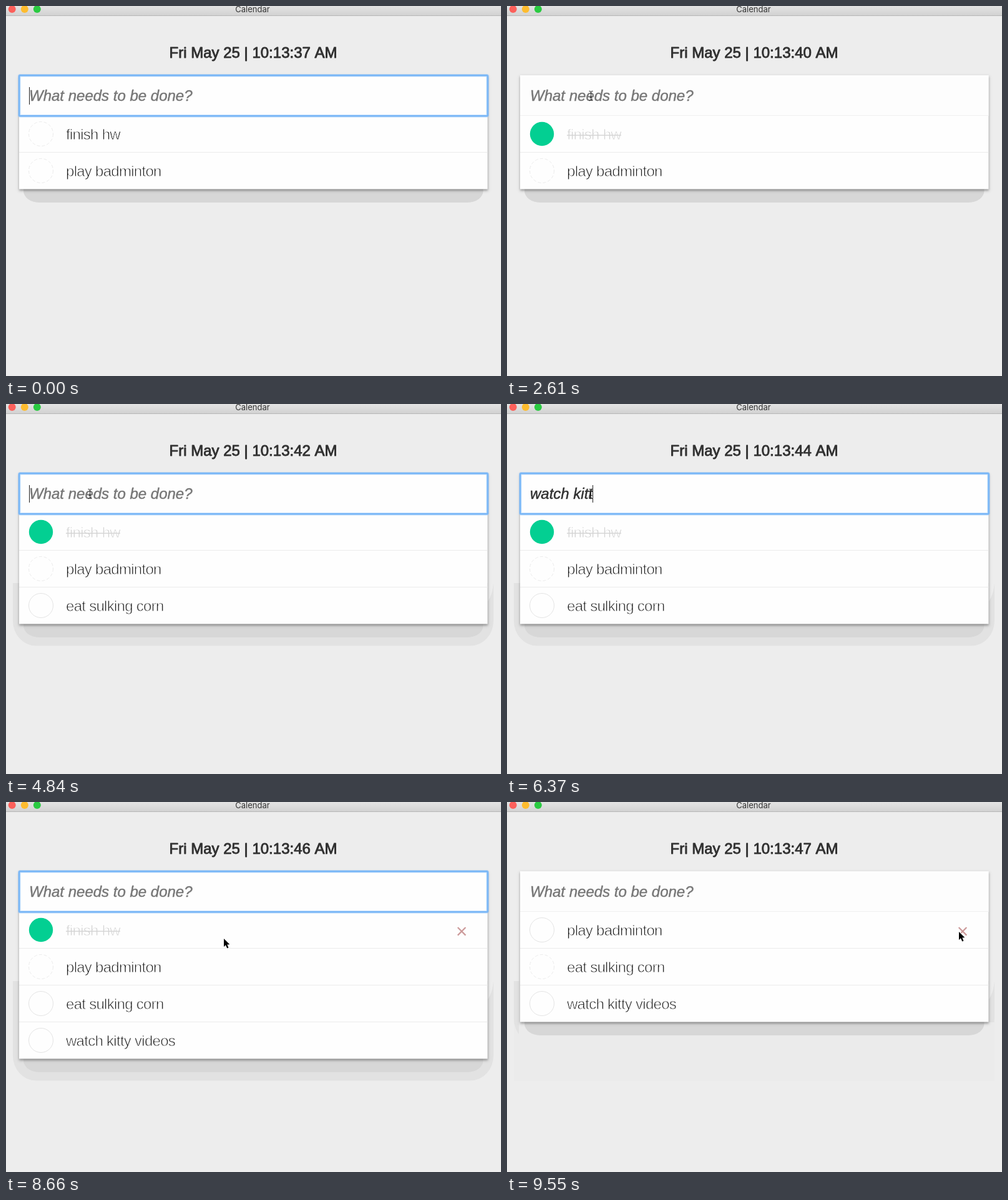
An HTML page with a canvas for the animation above (9.79 s loop, 793 px wide and 593 px high).

```html
<!DOCTYPE html>
<html lang="en">
<head>
<meta charset="utf-8">
<title>Calendar</title>
<style>
  html, body { margin: 0; width: 100%; height: 100%; overflow: hidden; background: #ededed; }
  canvas { display: block; }
</style>
</head>
<body>
<canvas id="stage" width="793" height="593"></canvas>
<script>
const ctx = document.getElementById('stage').getContext('2d');
const W = 793, H = 593, LOOP = 9790;
const SANS = '"Liberation Sans", Arial, sans-serif';
const LEFT = 21, RIGHT = 771.5, TOP = 111, LIST = 176, ROW = 59;

const CHECK = 2050, ADD1 = 4840, ADD2 = 7160, REMOVE = 9500;
const TICKS = [420, 1420, 2420, 3420, 4420, 5250, 6280, 7240, 8350, 9400];
const BLURRED = [[2000, 2700], [9400, LOOP]];
const CARET_OFF = [[420, 920], [1420, 1920], [3200, 3230], [5310, 5540], [7660, 8160], [8660, 9160]];

// each part: text, time of first letter, time per letter
const TYPING = [
  { end: ADD1, parts: [['eat sulking', 3230, 96], [' corn', 4310, 95]] },
  { end: ADD2, parts: [['w', 5540, 0], ['at', 5660, 0], ['ch kitty vide', 5900, 78], ['os', 6920, 90]] }
];

// time, x, y
const POINTER = [
  [570, 788, 100], [920, 520, 132], [1280, 520, 132], [1530, 230, 196],
  [1780, 64, 200], [2230, 64, 200], [2500, 134, 144], [8040, 134, 144],
  [8420, 348, 218], [8660, 348, 218], [9250, 723, 207], [LOOP, 723, 207]
];

const within = (t, spans) => spans.some(([a, b]) => t >= a && t < b);

function typedText(t) {
  const job = TYPING.find(j => t >= j.parts[0][1] && t < j.end);
  if (!job) return '';
  return job.parts.map(([text, start, step]) => {
    if (t < start) return '';
    return step ? text.slice(0, 1 + Math.floor((t - start) / step)) : text;
  }).join('');
}

function pointerAt(t) {
  const i = POINTER.findIndex(p => t < p[0]);
  if (i < 1) return null;
  const [t0, x0, y0] = POINTER[i - 1], [t1, x1, y1] = POINTER[i];
  const k = (t - t0) / (t1 - t0), e = k * k * (3 - 2 * k);
  return { x: x0 + (x1 - x0) * e, y: y0 + (y1 - y0) * e };
}

function itemsAt(t) {
  const list = [
    { text: 'finish hw', done: t >= CHECK, dashed: true },
    { text: 'play badminton', dashed: true }
  ];
  if (t >= ADD1) list.push({ text: 'eat sulking corn' });
  if (t >= ADD2) list.push({ text: 'watch kitty videos' });
  if (t >= REMOVE) {
    list.shift();
    list[0].dashed = false;
    list[1].dashed = true;
  }
  return list;
}

function rect(x, y, w, h, color) {
  ctx.fillStyle = color;
  ctx.fillRect(x, y, w, h);
}

function disc(x, y, r, color) {
  ctx.fillStyle = color;
  ctx.beginPath();
  ctx.arc(x, y, r, 0, 7);
  ctx.fill();
}

function line(points, color, width) {
  ctx.strokeStyle = color;
  ctx.lineWidth = width;
  ctx.beginPath();
  points.forEach(([x, y]) => ctx.lineTo(x, y));
  ctx.stroke();
}

// An extra outline in the text colour thickens it, one in the paper colour thins it.
function write(text, x, y, font, color, edge, edgeColor = color) {
  ctx.font = font;
  ctx.fillStyle = color;
  ctx.fillText(text, x, y);
  if (!edge) return;
  ctx.lineJoin = 'round';
  ctx.lineWidth = edge;
  ctx.strokeStyle = edgeColor;
  ctx.strokeText(text, x, y);
}

function titleBar() {
  const g = ctx.createLinearGradient(0, 0, 0, 15);
  g.addColorStop(0, '#e3e3e3');
  g.addColorStop(1, '#d2d2d2');
  rect(0, 0, W, 15, g);
  rect(0, 15, W, 1, '#b7b7b7');
  disc(9.7, 5, 6, '#fc605b');
  disc(29.8, 5, 6, '#fdbc2f');
  disc(49.8, 5, 6, '#2aca41');
  ctx.textAlign = 'center';
  write('Calendar', 395, 10, '13px Inter, Roboto, sans-serif', '#333');
}

function clock(t) {
  const sec = 37 + TICKS.filter(k => t >= k).length;
  write('Fri May 25 | 10:13:' + sec + ' AM', 396, 83, '24px ' + SANS, '#303030', 0.9);
  ctx.textAlign = 'left';
}

function bowl(x0, x1, y0, y1, rx, ry, color) {
  ctx.fillStyle = color;
  ctx.beginPath();
  ctx.moveTo(x0, y0);
  ctx.lineTo(x0, y1 - ry);
  ctx.ellipse(x0 + rx, y1 - ry, rx, ry, 0, Math.PI, Math.PI / 2, true);
  ctx.lineTo(x1 - rx, y1);
  ctx.ellipse(x1 - rx, y1 - ry, rx, ry, 0, Math.PI / 2, 0, true);
  ctx.lineTo(x1, y0);
  ctx.fill();
}

function outerShade(t, bottom) {
  if (t < ADD1) return;
  ctx.save();
  ctx.beginPath();
  if (t >= REMOVE) {
    rect(11, 287, 770, 160, '#ebebeb');
    ctx.rect(11, 287, 8, 101);
    ctx.rect(771, 287, 10, 66);
  } else {
    ctx.rect(0, 287, W, 200);
  }
  ctx.clip();
  bowl(11, 781, 287, bottom + 35, 37, 40, '#e2e2e2');
  ctx.fillStyle = '#ededed';
  ctx.beginPath();
  ctx.moveTo(772, 287);
  ctx.lineTo(781, 287);
  ctx.quadraticCurveTo(779, 307, 772, 316);
  ctx.fill();
  ctx.restore();
}

function card(t, bottom) {
  outerShade(t, bottom);
  bowl(28, 764.5, bottom - 5, bottom + 21.5, 25, 19, '#d7d7d7');
  ctx.save();
  ctx.shadowColor = 'rgba(0,0,0,.36)';
  ctx.shadowBlur = 4;
  ctx.shadowOffsetY = 2;
  rect(LEFT, TOP, RIGHT - LEFT, bottom - TOP, '#fefefe');
  ctx.restore();
}

function inputBox(t, text, focused) {
  rect(LEFT, TOP, RIGHT - LEFT, LIST - TOP, focused ? '#fefefe' : '#fdfdfd');
  rect(LEFT, LIST - 1, RIGHT - LEFT, 1, '#f0f0f0');
  if (focused) {
    [[4.4, 'rgba(120,184,250,.45)'], [2.4, '#78b6f6']].forEach(([w, color]) => {
      ctx.strokeStyle = color;
      ctx.lineWidth = w;
      ctx.beginPath();
      ctx.roundRect(21.2, 111.2, 750.4, 65, 1.5);
      ctx.stroke();
    });
  }
  const font = 'italic 24px ' + SANS;
  if (text) write(text, 37, 152, font, '#303030', 0.45);
  else write('What needs to be done?', 37, 152, font, '#777', 0.45);
  if (focused && !within(t, CARET_OFF)) {
    const x = text ? Math.round(37 + ctx.measureText(text).width) : 37;
    rect(x, 130, 1, 28, '#222');
  }
}

function checkbox(item, y) {
  if (item.done) {
    disc(56, y, 19.2, '#03cf92');
    return;
  }
  ctx.strokeStyle = item.dashed ? '#ececec' : '#e4e4e4';
  ctx.lineWidth = 1;
  ctx.setLineDash(item.dashed ? [5, 3] : []);
  ctx.beginPath();
  ctx.arc(56, y, 19.5, 0, Math.PI * 2);
  ctx.stroke();
  ctx.setLineDash([]);
}

function row(item, i, hovered) {
  const y = LIST + ROW * i;
  if (i) rect(LEFT, y - 1, RIGHT - LEFT, 1, '#ebebeb');
  checkbox(item, y + 29);
  const color = item.done ? '#d2d2d2' : '#1c1c1c';
  ctx.letterSpacing = '-0.72px';
  write(item.text, 96, y + 38, '24px ' + SANS, color, 0.8, '#fefefe');
  const width = ctx.measureText(item.text).width;
  ctx.letterSpacing = '0px';
  if (item.done) rect(96, y + 30.5, width, 1.4, '#d4d4d4');
  if (hovered) {
    const c = '#cc9a9a';
    line([[723.7, y + 25], [736.3, y + 37.6]], c, 2.2);
    line([[736.3, y + 25], [723.7, y + 37.6]], c, 2.2);
  }
}

function arrow(x, y) {
  ctx.save();
  ctx.translate(x + 1, y + 1);
  ctx.beginPath();
  [[0, 0], [0, 13], [3, 10.3], [5.2, 15.6], [7.5, 14.6], [5.3, 9.6], [9.3, 9.3]]
    .forEach(([px, py]) => ctx.lineTo(px, py));
  ctx.closePath();
  ctx.lineJoin = 'round';
  ctx.strokeStyle = '#fff';
  ctx.lineWidth = 2;
  ctx.stroke();
  ctx.fillStyle = '#000';
  ctx.fill();
  ctx.restore();
}

function beam(x, y) {
  x = Math.round(x) + 0.5;
  y = Math.round(y);
  line([[x - 3, y - 7.5], [x - 1, y - 7.5], [x, y - 6], [x, y + 6], [x - 1, y + 7.5], [x - 3, y + 7.5]], '#222', 1);
  line([[x + 3, y - 7.5], [x + 1, y - 7.5], [x, y - 6]], '#222', 1);
  line([[x + 3, y + 7.5], [x + 1, y + 7.5], [x, y + 6]], '#222', 1);
  line([[x - 2, y + 2.5], [x + 2, y + 2.5]], '#222', 1);
}

function draw(t) {
  const items = itemsAt(t);
  const bottom = LIST + ROW * items.length - 0.5;
  const p = pointerAt(t);
  const inCard = p && p.x > LEFT && p.x < RIGHT;
  const overInput = inCard && p.y > TOP && p.y < LIST;
  const hoverRow = inCard && p.y >= LIST ? Math.floor((p.y - LIST) / ROW) : -1;

  rect(0, 0, W, H, '#ededed');
  titleBar();
  clock(t);
  card(t, bottom);
  items.forEach((item, i) => row(item, i, i === hoverRow));
  inputBox(t, typedText(t), !within(t, BLURRED));
  if (p) (overInput ? beam : arrow)(p.x, p.y);
}

const begin = performance.now();
function tick() {
  draw((performance.now() - begin) % LOOP);
  requestAnimationFrame(tick);
}
tick();
</script>
</body>
</html>
```
